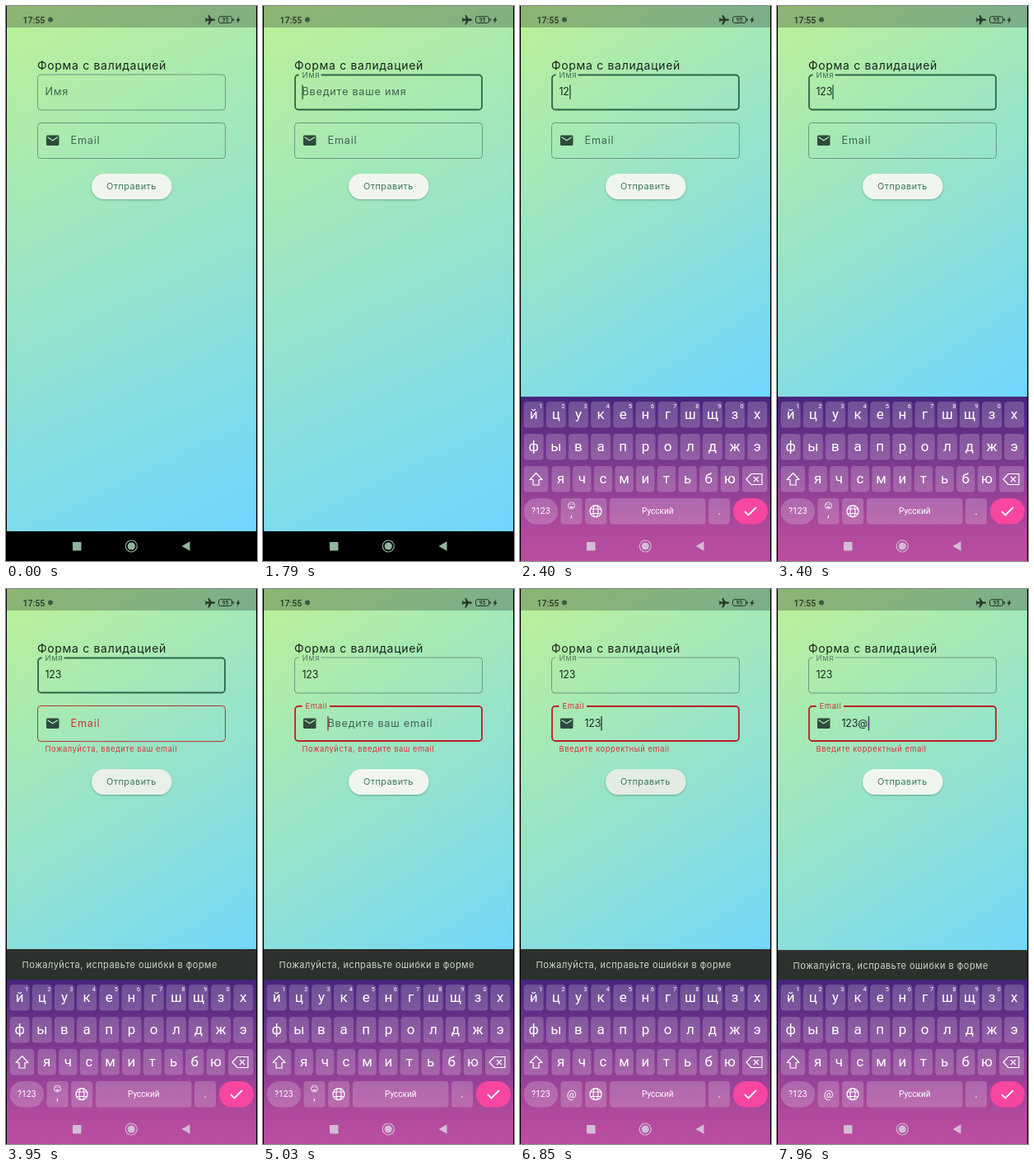
An HTML page that plays this animation: 305x672 px, repeating every 8 s.

```html
<!DOCTYPE html>
<html lang="ru">
<head>
<meta charset="utf-8">
<title>Форма с валидацией</title>
<style>
html, body { margin: 0; width: 100%; height: 100%; overflow: hidden; background: #000; }
svg { display: block; width: 100%; height: 100%; }
text { font-family: Inter, "Open Sans", sans-serif; white-space: pre; }
.sys text { font-family: Roboto, "Noto Sans", sans-serif; }
.head { font-size: 14px; letter-spacing: .68px; fill: #17251c; }
.field { font-size: 12.7px; letter-spacing: .76px; }
.value { font-size: 12.4px; letter-spacing: -.2px; fill: #1c2a22; }
.error { font-size: 9.3px; letter-spacing: .56px; fill: #d8323a; }
.action { font-size: 10.9px; letter-spacing: .45px; fill: #3d7657; }
.snack { font-size: 11px; letter-spacing: .47px; fill: #c9d9c8; }
#nav circle + circle { stroke-width: 1.2px; }
</style>
</head>
<body>
<svg viewBox="0 0 305 672" preserveAspectRatio="none">
  <defs>
    <linearGradient id="sky" gradientUnits="userSpaceOnUse" x1="0" y1="0" x2="304" y2="636">
      <stop stop-color="#bdf196"/><stop offset="1" stop-color="#70d6ff"/>
    </linearGradient>
    <linearGradient id="dusk" x1="0" y1="0" x2="0" y2="1">
      <stop stop-color="#46247c"/><stop offset=".4" stop-color="#7c3890"/>
      <stop offset=".82" stop-color="#b14a9e"/><stop offset="1" stop-color="#ba4ea1"/>
    </linearGradient>
    <filter id="shade" x="-10%" y="-20%" width="120%" height="150%">
      <feDropShadow dx="0" dy="1" stdDeviation=".8" flood-color="#1d4a3c" flood-opacity=".4"/>
    </filter>
    <clipPath id="pill"><rect x="104" y="203" width="97.5" height="31" rx="15.5"/></clipPath>
  </defs>

  <rect width="305" height="672"/>
  <rect x="1" width="303" height="636" fill="#eef8fb"/>
  <rect id="page" x="1" width="303" fill="url(#sky)"/>
  <rect x="1" width="303" height="26" fill="#000" opacity=".25"/>
  <g class="sys" fill="#243528">
    <text x="20.5" y="20.5" font-size="10.5" font-weight="500">17:55</text>
    <circle cx="54" cy="16.5" r="3" fill="#3d5b42"/>
    <path transform="translate(248 16.7) rotate(90) scale(.58) translate(-11.5 -12)" stroke="#243528" d="M21 16v-2l-8-5V3.5c0-.83-.67-1.5-1.5-1.5S10 2.67 10 3.5V9l-8 5v2l8-2.5V19l-2 1.5V22l3.5-1 3.5 1v-1.5L13 19v-5.5l8 2.5z"/>
    <rect x="258.5" y="12.7" width="16" height="7.8" rx="2.2" fill="none" stroke="#243528"/>
    <path d="M275.5 15h1.3v3.2h-1.3zM283.5 12.5l-4.2 5h2.3l-1 3.7 4.2-5.2h-2.3z"/>
    <text x="266.5" y="19" font-size="6.5" font-weight="500" text-anchor="middle">95</text>
  </g>

  <text class="head" x="38" y="77">Форма с валидацией</text>
  <g id="form"></g>
  <path fill="#2f4a3d" transform="translate(47.4 153.4) scale(.777)" d="M20 4H4c-1.1 0-2 .9-2 2v12c0 1.1.9 2 2 2h16c1.1 0 2-.9 2-2V6c0-1.1-.9-2-2-2zm0 4l-8 5-8-5V6l8 5 8-5v2z"/>
  <text id="error" class="error" x="47.5" y="196.5"></text>
  <g id="button">
    <rect x="104" y="203" width="97.5" height="31" rx="15.5" fill="#f0f6ee" filter="url(#shade)"/>
    <circle id="ripple" cx="152" cy="218" fill="#2f6148" clip-path="url(#pill)"/>
    <text class="action" x="122" y="222.3">Отправить</text>
  </g>

  <g id="snack">
    <rect x="1" y="436" width="303" height="37" fill="#2c312d"/>
    <text class="snack" x="19.5" y="458.7">Пожалуйста, исправьте ошибки в форме</text>
  </g>
  <rect y="636" width="305" height="36"/>
  <g id="keyboard" class="sys" fill="#fff"></g>
  <g id="nav" stroke-width="0">
    <rect x="81" y="649" width="10.5" height="10.5" rx="1"/>
    <circle cx="152.3" cy="654" r="4.6"/>
    <circle cx="152.3" cy="654" r="7" fill="none"/>
    <path d="M213.5 654l10-5.7v11.4z"/>
  </g>
</svg>

<script>
const LOOP = 8000, KEY_TOP = 473, KEY_HEIGHT = 199, NAV_TOP = 636;
const $ = id => document.getElementById(id);
const clamp = v => Math.max(0, Math.min(1, v));
const ramp = (t, start, length) => clamp((t - start) / length);
const mix = (a, b, p) => a + (b - a) * p;
const smooth = p => p * p * (3 - 2 * p);
const within = (t, a, b) => t >= a && t < b;

function add(parent, tag, attrs, content) {
  const node = document.createElementNS("http://www.w3.org/2000/svg", tag);
  set(node, attrs);
  if (content !== undefined) node.textContent = content;
  return parent.appendChild(node);
}
function set(node, attrs) {
  for (const name in attrs) node.setAttribute(name, attrs[name]);
}

const board = $("keyboard");
function key(x, y, width, label, size = 17, round = 4) {
  add(board, "rect", { x, y, width, height: 31.5, rx: round, "fill-opacity": .2 });
  return add(board, "text", { x: x + width / 2, y: y + 15.5 + size * .34, "font-size": size, "text-anchor": "middle" }, label);
}
function line(d, attrs) {
  return add(board, "path", { d, fill: "none", stroke: "#fff", "stroke-width": 1.2, ...attrs });
}

function buildKeyboard() {
  add(board, "rect", { x: 1, y: KEY_TOP, width: 303, height: KEY_HEIGHT, fill: "url(#dusk)" });
  ["йцукенгшщзх", "фывапролджэ"].forEach((row, r) => [...row].forEach((letter, i) => {
    const x = 4.6 + i * 27.17;
    key(x, 479 + r * 39, 24, letter);
    if (!r && i < 10) add(board, "text", { x: x + 20.5, y: 487, "font-size": 7.5, "text-anchor": "middle" }, (i + 1) % 10);
  }));
  [..."ячсмитьбю"].forEach((letter, i) => key(38.5 + i * 25.65, 557, 22.4, letter));
  key(4.6, 557, 29.5, "");
  line("M19.5 565.5l-7.5 8h4v6.5h7v-6.5h4z", { "stroke-linejoin": "round" });
  key(270, 557, 30.5, "");
  line("M281 566.5h13v13h-13l-6-6.5zM284 570l6 6m0-6l-6 6");
  key(4.6, 596, 41.5, "?123", 10.5, 15.7);
  const at = key(49.5, 596, 26, "@", 13);
  const comma = add(board, "g", {});
  add(comma, "text", { x: 62.5, y: 619, "font-size": 14, "text-anchor": "middle" }, ",");
  add(comma, "circle", { cx: 62.5, cy: 605, r: 4, fill: "none", stroke: "#fff", "stroke-width": .8 });
  add(comma, "path", { d: "M60.5 604h1v-1h-1zm3 0h1v-1h-1zm-3.2 2h4.4a2.3 2.3 0 0 1-4.4 0z" });
  key(79.2, 596, 26, "");
  line("M85 611.7a7 7 0 1 0 14 0a7 7 0 1 0-14 0M89 611.7a3 7 0 1 0 6 0a3 7 0 1 0-6 0M86 609h12M86 614.5h12");
  key(109, 596, 116.5, "Русский", 10);
  key(229, 596, 26, ".", 14);
  add(board, "rect", { x: 259, y: 596, width: 42, height: 31.5, rx: 15.7, fill: "#f646a0" });
  line("M273 612l4.5 4.5 9.5-9.5", { "stroke-width": 1.8 });
  return { at, comma };
}

function buildField(top, textX, floatX, labelText, hintText) {
  const form = $("form"), base = top + 25.8;
  const border = add(form, "path", { fill: "none" });
  const hint = add(form, "text", { class: "field", x: textX, y: base, fill: "#426355" }, hintText);
  const label = add(form, "text", { class: "field" }, labelText);
  const value = add(form, "text", { class: "value", x: textX, y: base });
  const caret = add(form, "rect", { y: top + 13, width: 1.4, height: 17.5 });
  const gapWidth = labelText.length * 3.2 + 17.5;

  return s => {
    const p = smooth(s.float);
    // The stroke grows inwards, so its outer edge stays put.
    const stroke = s.focus ? 2 : 1, inset = stroke / 2;
    const left = 38 + inset, right = 267 - inset, y = top + inset, side = 36 - stroke;
    const mid = floatX + gapWidth / 2 - 4, half = gapWidth / 2 * p;
    set(border, {
      d: `M${mid + half} ${y}H${right - 4}a4 4 0 0 1 4 4v${side}a4 4 0 0 1-4 4H${left + 4}a4 4 0 0 1-4-4v-${side}a4 4 0 0 1 4-4H${mid - half}`,
      stroke: s.line, "stroke-width": stroke * .9
    });
    set(label, {
      transform: `translate(${mix(textX, floatX, p)} ${mix(base, top + 4.3, p)}) scale(${mix(1, .75, p)})`,
      fill: s.ink
    });
    set(hint, { opacity: s.text ? 0 : s.hint });
    value.textContent = s.text;
    set(caret, { x: s.caretX, fill: s.caretInk, opacity: s.caret ? 1 : 0 });
  };
}

const swap = buildKeyboard();
const nameField = buildField(82.5, 47.5, 47.5, "Имя", "Введите ваше имя");
const mailField = buildField(141, 78.5, 51.5, "Email", "Введите ваш email");

const typed = (t, start) => "123".slice(0, t < start ? 0 : 1 + Math.floor((t - start) / 70));
const caretAt = (x, count) => x + [0, 6, 13, 20, 32.5][count];

function press(t, start) {
  return { grow: ramp(t, start, 260), fade: ramp(t, start, 100) * (1 - ramp(t, start + 350, 400)) };
}

function draw(t) {
  const rise = 1 - (1 - ramp(t, 1800, 335)) ** 3;
  const drop = (1 - rise) * KEY_HEIGHT;
  // The page shrinks slightly ahead of the keyboard.
  const bottom = Math.min(NAV_TOP, KEY_TOP + drop * .85);
  set($("page"), { height: bottom });
  set($("sky"), { y2: bottom });
  set(board, { transform: `translate(0 ${drop})`, visibility: rise ? "visible" : "hidden" });
  const navInk = rise > .5 ? "#d3bcd6" : "#8fb59c";
  set($("nav"), { fill: navInk, stroke: navInk });

  const onName = within(t, 1450, 4890), onMail = t >= 4890, failed = t >= 3640;
  const nameText = typed(t, 2270);
  nameField({
    float: ramp(t, 1450, 167), hint: ramp(t, 1500, 167), text: nameText, focus: onName,
    line: onName ? "#2c6848" : "#668f7d", ink: onName ? "#3a7455" : t < 1450 ? "#426552" : "#537c6a",
    caretX: caretAt(47.3, nameText.length), caretInk: "#2a5c45",
    caret: onName && !within(t, 2870, 3400) && !within(t, 3890, 4400)
  });

  const mailText = typed(t, 5570) + (t >= 7480 ? "@" : "");
  mailField({
    float: ramp(t, 4890, 140), hint: ramp(t, 4910, 120), text: mailText, focus: onMail,
    line: failed ? "#bd1f26" : "#668f7d", ink: failed ? "#c8353a" : "#426552",
    caretX: caretAt(78.3, mailText.length),
    caretInk: mailText.length > 3 ? "#49307c" : mailText ? "#2a3c38" : "#9a3038",
    caret: onMail && !within(t, 6180, 6580) && !within(t, 7080, 7410)
  });

  $("error").textContent = t < 6720 ? "Пожалуйста, введите ваш email" : "Введите корректный email";
  set($("error"), { opacity: ramp(t, 3640, 167) });
  set($("button"), { transform: `translate(0 ${failed ? 15 : 0})` });
  const touch = press(t, t < 5000 ? 3410 : 6580);
  set($("ripple"), { r: mix(8, 54, touch.grow), opacity: .07 * touch.fade });

  const shown = smooth(ramp(t, 3640, 250)) * (1 - smooth(ramp(t, 7935, 250)));
  set($("snack"), { transform: `translate(0 ${37 * (1 - shown)})`, visibility: shown ? "visible" : "hidden" });

  const mailKeys = t >= 5200;
  set(swap.at, { opacity: mailKeys ? 1 : 0 });
  set(swap.comma, { opacity: mailKeys ? 0 : 1 });
}

function tick() {
  draw(performance.now() % LOOP);
  requestAnimationFrame(tick);
}
tick();
</script>
</body>
</html>
```
